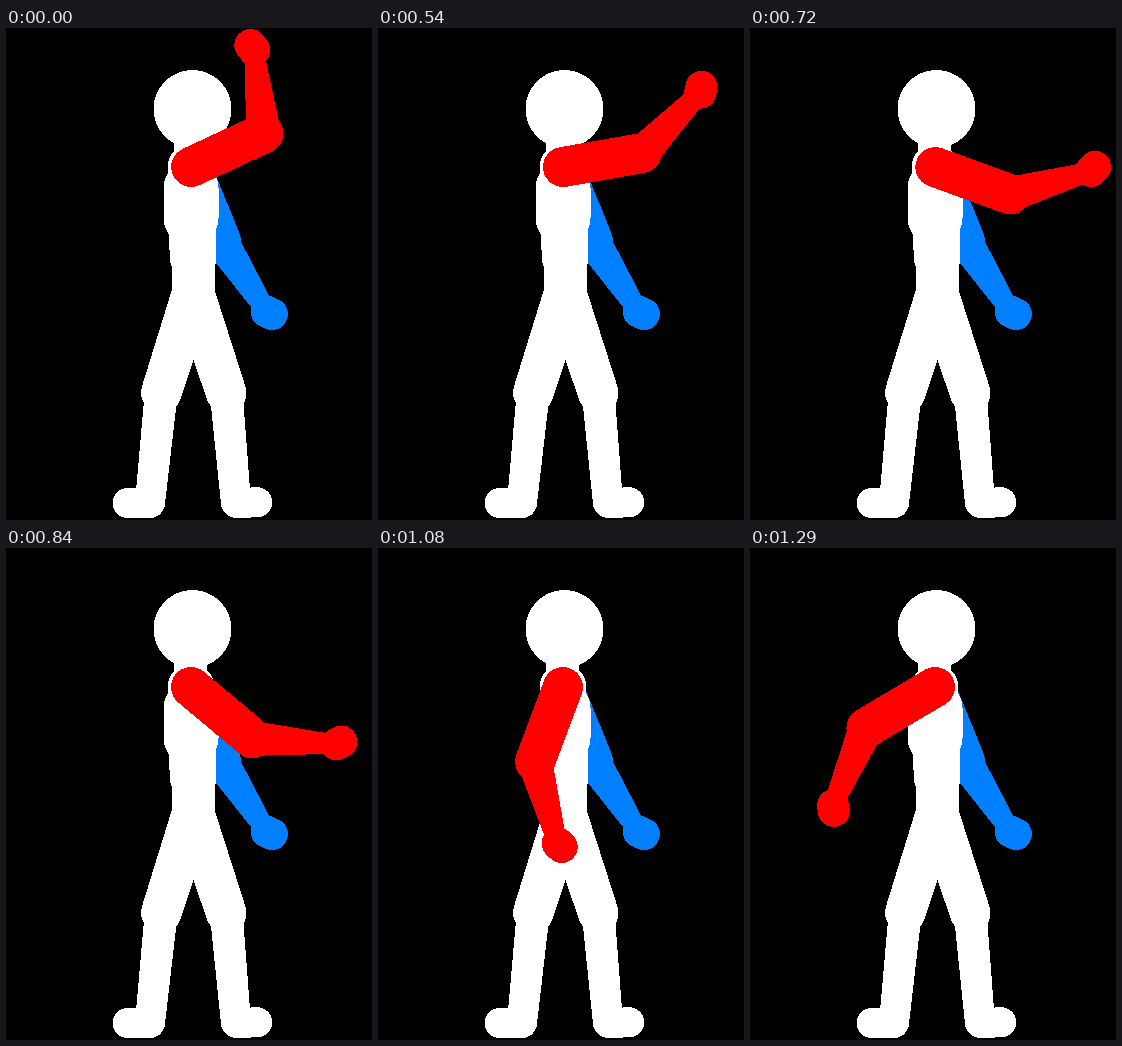
Recreate the animation shown at these times as an HTML page. Size 366 by 492 pixels, loop 1.8 s.

```html
<!DOCTYPE html>
<html lang="en">
<head>
<meta charset="utf-8">
<title>Arm swing</title>
<style>
  html, body { margin: 0; width: 100%; height: 100%; overflow: hidden; background: #000; }
  svg { display: block; width: 100vw; height: 100vh; shape-rendering: crispEdges; }
</style>
</head>
<body>
<svg viewBox="0 0 366 492">
  <path id="back" fill="#0080ff"/>
  <path id="body" fill="#fff"/>
  <path id="front" fill="#f00"/>
</svg>
<script>
const LOOP = 1800, STEP = 30, HOLD = 11, LAST = 32;
const SHOULDER = [185, 139];
const UPPER = 80, FORE = 84, HAND = 6, HAND_BEND = -31;

// [step, upper arm angle in degrees]
const SWING = [[0, -24.9], [6, -15], [18, 45], [24, 105], [LAST, 149.3]];
const BENT = -71.6, RELAXED = -36, UNBEND_STEPS = 6;

const el = id => document.getElementById(id);

// Tapered bone with round ends
function bone([x1, y1], r1, [x2, y2], r2) {
  const a = Math.atan2(y2 - y1, x2 - x1);
  const nx = -Math.sin(a), ny = Math.cos(a);
  const at = (x, y, r) => `${(x + nx * r).toFixed(2)} ${(y + ny * r).toFixed(2)}`;
  return `M${at(x1, y1, r1)}L${at(x2, y2, r2)}A${r2} ${r2} 0 0 0 ${at(x2, y2, -r2)}` +
         `L${at(x1, y1, -r1)}A${r1} ${r1} 0 0 0 ${at(x1, y1, r1)}Z`;
}

function reach([x, y], deg, len) {
  const a = deg * Math.PI / 180;
  return [x + Math.cos(a) * len, y + Math.sin(a) * len];
}

function arm(angle, bend) {
  const elbow = reach(SHOULDER, angle, UPPER);
  const wrist = reach(elbow, angle + bend, FORE);
  const tip = reach(wrist, angle + bend + HAND_BEND, HAND);
  return bone(SHOULDER, 20, elbow, 20) + bone(elbow, 17.5, wrist, 9.5) + bone(wrist, 16, tip, 16);
}

function leg(knee, ankle, toe) {
  return bone([187.2, 265], 21.3, knee, 20.3) + bone(knee, 16.5, ankle, 15) + bone(ankle, 15, toe, 15);
}

function swingAt(k) {
  const i = Math.max(1, SWING.findIndex(([s]) => s >= k));
  const [s0, a0] = SWING[i - 1], [s1, a1] = SWING[i];
  return a0 + (a1 - a0) * (k - s0) / (s1 - s0);
}

function bendAt(k) {
  const left = 1 - Math.min(1, k / UNBEND_STEPS);
  return RELAXED + (BENT - RELAXED) * left ** 1.5;
}

el('back').setAttribute('d', arm(68, -11));
el('body').setAttribute('d', [
  bone([186.5, 81], 39, [186.5, 81], 39),
  bone([184.5, 110], 16.5, [184.5, 130], 16.5),
  bone(SHOULDER, 23.3, SHOULDER, 23.3),
  bone([185, 160], 27.5, [185, 190], 27.5),
  bone([186.5, 200], 24, [187.2, 230], 23.3),
  bone([187.2, 230], 21.3, [187.2, 265], 21.3),
  leg([155.2, 365], [144, 475], [121.5, 475]),
  leg([220.2, 365], [230, 475], [251.5, 474.3])
].join(''));

let shown = -1;
function draw(now) {
  const k = Math.min(LAST, Math.max(0, Math.floor((now % LOOP) / STEP) - HOLD));
  if (k !== shown) {
    shown = k;
    el('front').setAttribute('d', arm(swingAt(k), bendAt(k)));
  }
}

const start = performance.now();
function tick() {
  draw(performance.now() - start);
  requestAnimationFrame(tick);
}
tick();
</script>
</body>
</html>
```
